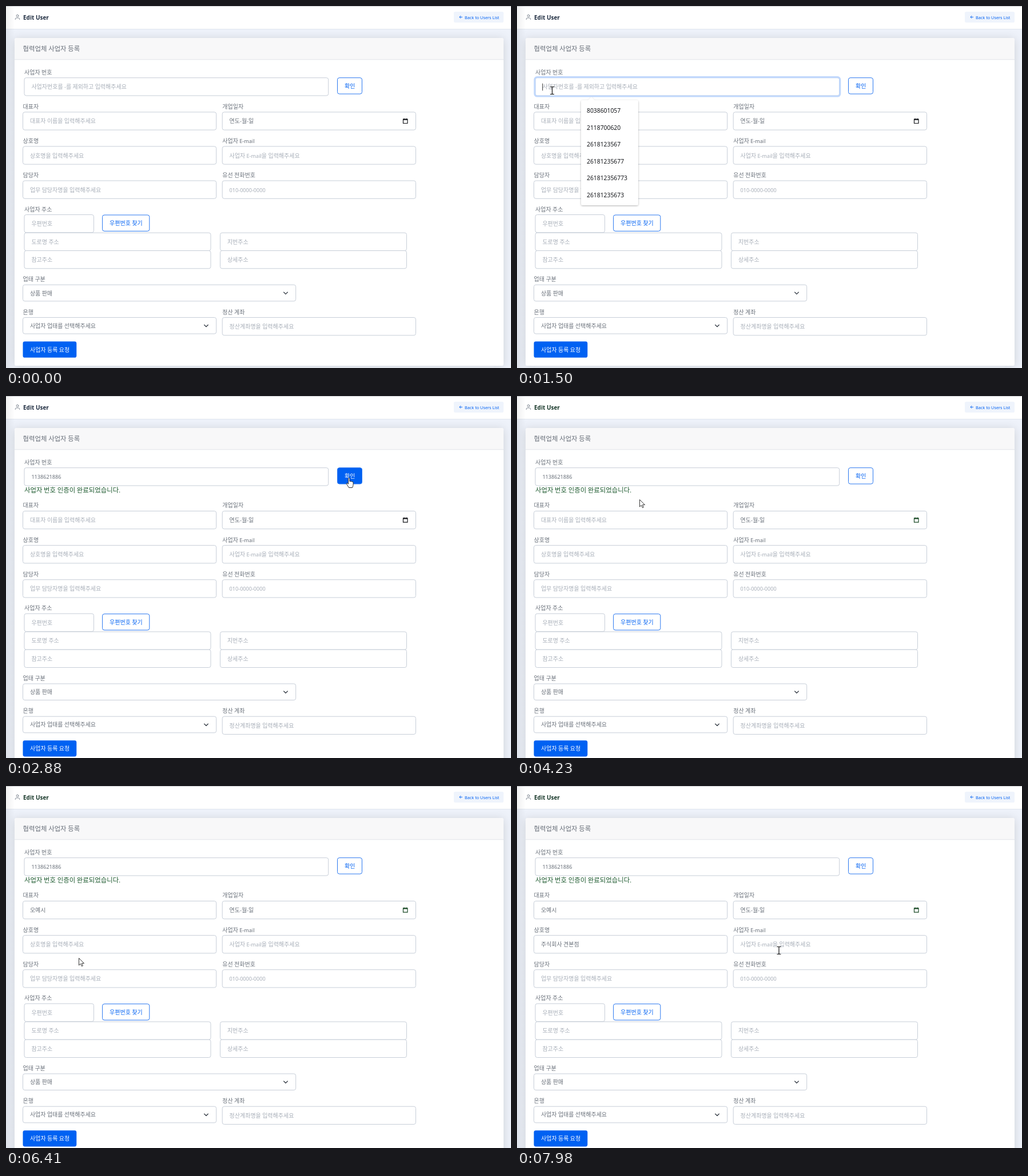
Write an HTML page that moves like this. It is 883 px wide and 634 px high and loops after 8 s.

```html
<!DOCTYPE html>
<html lang="ko">
<head>
<meta charset="utf-8">
<title>Edit User</title>
<style>
html, body { margin: 0; width: 100%; height: 100%; overflow: hidden; background: #eef2fa; }
svg { display: block; width: 883px; height: 634px; }
text { font: 9.1px "Noto Sans", "Noto Sans CJK KR", sans-serif; fill: #69707a; }
.ko { font-family: "Noto Sans CJK KR", "Noto Sans CJK", sans-serif; font-size: 1.1em; }
.big { font-size: 10.35px; }
.head { font-size: 10px; font-weight: 600; fill: #1f2d41; }
.small { font-size: 7.3px; }
.blue { fill: #0061f2; }
.white { fill: #fff; }
.hint { fill: #a7aeb8; }
.pick { font-size: 10.35px; fill: #16181c; }
.done { font-size: 10.35px; fill: #1d5a2f; }
.box { fill: #fff; stroke: #c5ccd6; stroke-width: .95; }
.btn { fill: #fff; stroke: #2a78f0; stroke-width: 1; }
.ring { fill: none; stroke: #bfd7fc; stroke-width: 3.2; }
.line { fill: none; stroke: #363d47; stroke-width: 1.3; stroke-linecap: round; stroke-linejoin: round; }
.caret { stroke: #333; stroke-width: 1; }
.wave { fill: none; stroke: #e2403a; stroke-width: .9; }
</style>
</head>
<body>
<svg id="stage" viewBox="0 0 883 634">
  <defs>
    <filter id="soft" x="-10%" y="-10%" width="120%" height="120%">
      <feDropShadow dx="0" dy="1.6" stdDeviation="8" flood-color="#212832" flood-opacity=".15"/>
    </filter>
    <filter id="lift" x="-20%" y="-10%" width="140%" height="120%">
      <feDropShadow dx="0" dy="1" stdDeviation="1.6" flood-color="#000" flood-opacity=".3"/>
    </filter>
    <linearGradient id="edge">
      <stop stop-color="#212832" stop-opacity=".07"/>
      <stop offset="1" stop-color="#212832" stop-opacity="0"/>
    </linearGradient>
  </defs>
  <rect width="883" height="634" fill="#eef2fa"/>
  <rect width="883" height="40" fill="#fff"/>
  <path d="M0 40.5H883" stroke="#e0e5ee"/>
  <path d="M0 .5H883" stroke="#c9cbcf"/>
  <rect width="15" height="634" fill="url(#edge)"/>
  <g fill="none" stroke="#7c8490" stroke-width=".95" stroke-linecap="round">
    <circle cx="20" cy="17.2" r="1.9"/>
    <path d="M16.3 23.6v-.7a2 2 0 0 1 2-2h3.4a2 2 0 0 1 2 2v.7"/>
  </g>
  <rect x="783" y="10" width="87" height="19" rx="2.5" fill="#eff4fc"/>
  <path d="M798 19.4h-5m2.3-2.4l-2.4 2.4 2.4 2.4" fill="none" stroke="#0061f2" stroke-width=".9"/>
  <rect id="card" x="15" y="56" width="855" height="574" rx="3.6" fill="#fff" filter="url(#soft)"/>
  <path d="M15 93.5V59.6a3.6 3.6 0 0 1 3.6-3.6H866.4a3.6 3.6 0 0 1 3.6 3.6V93.5z" fill="#f8f8f9"/>
  <path d="M15 93.8H870" stroke="#e0e3e8"/>
  <g id="top"></g>
  <g id="form"></g>
  <g id="list">
    <path d="M115 165H124.500L130 159.500L135.500 165H209a3 3 0 0 1 3 3V346a3 3 0 0 1-3 3H115a3 3 0 0 1-3-3V168a3 3 0 0 1 3-3z" fill="#fff" filter="url(#lift)"/>
  </g>
  <g id="pointer">
    <path id="arrow" d="M.5 .5V13L3.400 10.300L5.400 14.700L7.300 13.900L5.400 9.600H9.500z" fill="#fff" stroke="#222" stroke-width=".9"/>
    <path id="ibeam" d="M-3.500-6.500h2.700L0-5.800.800-6.500H3.500M0-5.800V5.800M-3.500 6.500h2.700L0 5.800.800 6.500H3.500" fill="none" stroke="#111" stroke-width="1.2"/>
    <path id="hand" d="M-1 8V1.200a1.200 1.200 0 0 1 2.400 0V6q1.200-.9 2.200.3 1.200-.8 2.100.4 1.800-.4 1.900 1.300V11.500q0 2.500-1.500 5.500H0L-3.800 10.800q-.9-1.700.5-1.900 1 0 2.300 1.800z" fill="#fff" stroke="#222" stroke-width=".95" stroke-linejoin="round"/>
  </g>
</svg>
<script>
const $ = id => document.getElementById(id);
const LOOP = 8000, SHIFT = 15.7;
const top_ = $('top'), form = $('form');
const hits = [];

function add(parent, tag, attrs = {}) {
  const el = document.createElementNS('http://www.w3.org/2000/svg', tag);
  for (const k in attrs) el.setAttribute(k, attrs[k]);
  parent.append(el);
  return el;
}

// Hangul runs get their own face and a slightly larger size.
function write(el, str) {
  if (el.dataset.str === str) return;
  el.dataset.str = str;
  el.textContent = '';
  for (const part of str.split(/([ㄱ-힣]+)/)) {
    if (/[ㄱ-힣]/.test(part)) add(el, 'tspan', { class: 'ko' }).textContent = part;
    else el.append(part);
  }
}

function text(parent, x, mid, str, cls = '') {
  const el = add(parent, 'text', { x, y: mid + 3.6, class: cls });
  write(el, str);
  return el;
}

function box(parent, x, y, w, h, cls = 'box') {
  return add(parent, 'rect', { x, y, width: w, height: h, rx: 3.4, class: cls });
}

function input(parent, x, y, w, hint, cls = 'hint', h = 31.3) {
  const f = { x, y, w, h, hint };
  box(parent, x, y, w, h);
  f.ring = add(parent, 'rect', { x: x - 1, y: y - 1, width: w + 2, height: h + 2, rx: 4.2, class: 'ring', opacity: 0 });
  f.text = text(parent, x + 12.4, y + 16, hint, cls);
  f.wave = add(parent, 'path', { class: 'wave' });
  f.caret = add(parent, 'path', { class: 'caret' });
  hits.push({ x, y, w, h, kind: 'ibeam', low: parent === form });
  return f;
}

function button(parent, x, y, w, str, cls = 'btn', ink = 'blue') {
  const rect = box(parent, x, y, w, 28.3, cls);
  const label = text(parent, x + 12.5, y + 14.6, str, ink);
  hits.push({ x, y, w, h: 28.3, kind: 'hand', low: parent === form });
  return { rect, label };
}

function select(x, y, w, str) {
  box(form, x, y, w, 28.6);
  text(form, x + 12.4, y + 14.7, str);
  add(form, 'path', { class: 'line', d: `M${x + w - 21} ${y + 13}l3.300 3.300 3.300-3.300` });
}

text(top_, 30, 20.2, 'Edit User', 'head').id = 'title';
text(top_, 802, 19, 'Back to Users List', 'small blue');
text(top_, 29.6, 75, '협력업체 사업자 등록', 'big');
text(top_, 32, 116, '사업자 번호');
const biz = input(top_, 32, 125.7, 531.7, '사업자번호를 -를 제외하고 입력해주세요');
const check = button(top_, 579.5, 125.7, 43, '확인');
const done = text(top_, 32, 165, '사업자 번호 인증이 완료되었습니다.', 'done');

const rows = [
  ['대표자', '대표자 이름을 입력해주세요', '개업일자', '연도-월-일'],
  ['상호명', '상호명을 입력해주세요', '사업자 E-mail', '사업자 E-mail을 입력해주세요'],
  ['담당자', '업무 담당자명을 입력해주세요', '유선 전화번호', '010-0000-0000']
];
const left = rows.map(([a, b, c, d], i) => {
  const y = 185.8 + 60.1 * i;
  text(form, 29.6, y - 9.6, a);
  text(form, 378.3, y - 9.6, c);
  input(form, 378.2, y, 338.3, d, i ? 'hint' : '');
  return input(form, 29.5, y, 338.2, b);
});
const [owner, firm] = left;
const date = add(form, 'path', {
  d: 'M694.500 198.200h7.500v7.300h-7.500zM694.500 199.200h7.500M696.200 197v1.500M700.300 197v1.500', fill: 'none', 'stroke-width': 1.2
});

text(form, 32, 356, '사업자 주소');
input(form, 32, 365.5, 121.5, '우편번호');
button(form, 168.6, 366, 82.2, '우편번호 찾기');
[['도로명 주소', '지번주소'], ['참고주소', '상세주소']].forEach((pair, i) =>
  pair.forEach((s, j) => input(form, 32 + 342.5 * j, 397.2 + 31.3 * i, 326, s)));
text(form, 29.6, 478.7, '업태 구분');
select(29.5, 488.3, 477.2, '상품 판매');
text(form, 29.6, 536, '은행');
select(29.5, 545.5, 338.2, '사업자 업태를 선택해주세요');
text(form, 378.3, 536, '정산 계좌');
input(form, 378.2, 545.5, 338.3, '정산계좌명을 입력해주세요');
button(form, 29.5, 587.5, 93.8, '사업자 등록 요청', 'blue', 'white');

['8038601057', '2118700620', '2618123567', '26181235677', '261812356773', '26181235673']
  .forEach((s, i) => text($('list'), 122, 183.7 + 29.45 * i, s, 'pick'));

const number = '1138621886';
const typing = [
  { f: biz, focus: 1370, blur: 2640, from: 1600, to: 1900, caretOff: 2390,
    steps: [...number].map((_, i) => number.slice(0, i + 1)) },
  { f: owner, focus: 4700, blur: 6240, from: 4790, to: 5110, caretOff: 5450, wave: true,
    steps: 'ㅇ|오|옹|오예|오옛|오예시'.split('|') },
  { f: firm, focus: 6730, blur: 7580, from: 6800, to: 7450, caretOff: 7580, wave: true,
    steps: ('ㅈ|주|줏|주시|주식|주식ㅎ|주식호|주식회|주식횟|주식회사|주식회사 ㄱ|주식회사 겨|주식회사 견|' +
      '주식회사 견ㅂ|주식회사 견보|주식회사 견본|주식회사 견본ㅈ|주식회사 견본저|주식회사 견본점').split('|') }
];

// Each path is a stretch of time in which the pointer shows: [ms, x, y].
const paths = [
  [[460, 338, 327], [790, 150, 96], [1000, 82, 108], [1220, 61.5, 148], [1600, 61.5, 148]],
  [[1980, 61.5, 148], [2110, 597, 162], [2320, 598, 157], [2390, 599.5, 143.5], [3210, 599.5, 143.5]],
  [[3740, 590, 184], [4230, 214, 181], [4300, 214, 181], [4370, 200, 184], [4570, 200, 184], [4700, 110, 220], [4790, 110, 220]],
  [[5980, 150, 222], [6340, 127, 301], [6610, 127, 301], [6730, 100, 279], [6800, 100, 279]],
  [[7910, 458, 271], [7979, 458, 271], [7980, 458, 288], [8000, 458, 288]]
];

const clamp = v => Math.max(0, Math.min(1, v));
const ease = v => { v = clamp(v); return v * v * (3 - 2 * v); };
const show = (el, on) => el.setAttribute('visibility', on ? 'visible' : 'hidden');
const mix = (a, b, k) => `rgb(${a.map((v, i) => Math.round(v + (b[i] - v) * k))})`;

function drawField({ f, focus, blur, from, to, caretOff, wave, steps }, t) {
  const n = t < from ? 0 : Math.min(steps.length, 1 + Math.floor((t - from) / (to - from) * (steps.length - 1)));
  const value = n ? steps[n - 1] : '';
  write(f.text, value || f.hint);
  f.text.setAttribute('class', value ? '' : 'hint');
  f.ring.setAttribute('opacity', ease((t - focus) / 150) - ease((t - blur) / 130));
  const x = f.x + 12.4, end = x + (value ? f.text.getComputedTextLength() : .3);
  f.caret.setAttribute('d', `M${end} ${f.y + 10}v12.500`);
  show(f.caret, t >= focus && t < caretOff);
  let d = `M${x} ${f.y + 21.8}`;
  for (let i = x; i < end - 1; i += 3) d += 'q.750-1.100 1.500 0t1.500 0';
  f.wave.setAttribute('d', d);
  show(f.wave, wave && value && t < blur);
}

function drawPointer(t, shift) {
  const path = paths.find(p => t >= p[0][0] && t < p[p.length - 1][0]);
  show($('pointer'), path);
  if (!path) return;
  const i = path.findIndex(p => p[0] > t);
  const [t0, x0, y0] = path[i - 1], [t1, x1, y1] = path[i];
  const k = (t - t0) / (t1 - t0);
  const x = x0 + (x1 - x0) * k, y = y0 + (y1 - y0) * k;
  $('pointer').setAttribute('transform', `translate(${x} ${y})`);
  const hit = hits.find(h => {
    const top = h.y + (h.low ? shift : 0);
    return x >= h.x && x <= h.x + h.w && y >= top && y <= top + h.h;
  });
  const kind = hit ? hit.kind : 'arrow';
  for (const id of ['arrow', 'ibeam', 'hand']) $(id).style.display = id === kind ? '' : 'none';
}

function draw(t) {
  const shift = t >= 2880 ? SHIFT : 0;
  form.setAttribute('transform', `translate(0 ${shift})`);
  $('card').setAttribute('height', 574 + shift);
  show(done, shift);
  date.setAttribute('stroke', t >= 3740 ? '#1a4a26' : '#16181c');
  $('title').style.fill = t >= 3740 ? '#18382a' : '';
  show($('list'), t >= 1440 && t < 1620);
  const hover = t < 3210 ? ease((t - 2390) / 150) : 0;
  check.rect.style.fill = mix([255, 255, 255], [0, 97, 242], hover);
  check.label.style.fill = mix([0, 97, 242], [255, 255, 255], hover);
  typing.forEach(s => drawField(s, t));
  drawPointer(t, shift);
}

const start = performance.now();
function tick() {
  draw((performance.now() - start) % LOOP);
  requestAnimationFrame(tick);
}
tick();
</script>
</body>
</html>
```
